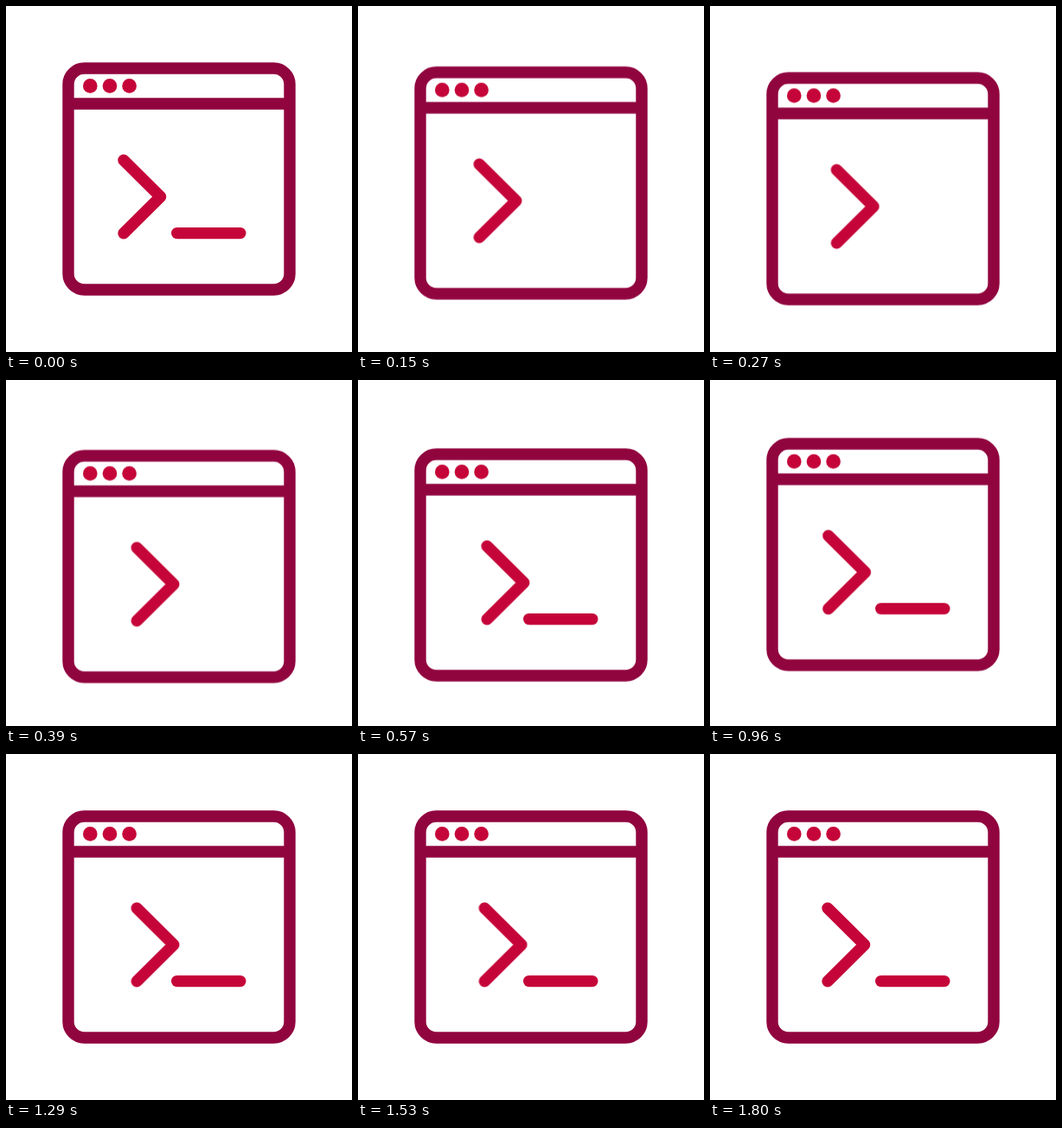
These frames come from a looping animation (400x400 px, 1830 ms). An HTML page:

```html
<!DOCTYPE html>
<html lang="en">
<head>
<meta charset="utf-8">
<title>Terminal icon</title>
<style>
  html, body { margin: 0; width: 100%; height: 100%; overflow: hidden; background: #fff; }
  svg { display: block; width: 100%; height: 100%; }
  .frame, .prompt { fill: none; stroke-width: 13.4; }
  .frame { stroke: #91053f; }
  .prompt { stroke: #c50539; stroke-linecap: round; stroke-linejoin: round; }
  .dots { fill: #c50539; }

  .window, .chevron, .cursor { animation: 1830ms infinite; }
  .window, .chevron { animation-timing-function: cubic-bezier(.3333, 0, .6667, 1); }
  .window { animation-name: dip; }
  .chevron { animation-name: nudge; }
  .cursor { animation-name: blink; animation-timing-function: step-end; }

  @keyframes dip {
    0%, 60.11%, 100% { transform: translateY(0); }
    22.95% { transform: translateY(15.8px); }
  }
  /* two pushes to the right, 900 ms each */
  @keyframes nudge {
    0%, 49.18%, 98.36%, 100% { transform: translateX(0); }
    24.59%, 73.77% { transform: translateX(16px); }
  }
  @keyframes blink {
    0%, 23.7% { visibility: visible; }
    8% { visibility: hidden; }
    100% { visibility: visible; }
  }
</style>
</head>
<body>
<svg viewBox="0 0 400 400">
  <g class="window">
    <g class="frame">
      <rect x="72" y="72" width="256" height="256" rx="18.5"/>
      <path d="M72 113H328"/>
    </g>
    <g class="dots">
      <circle cx="97.3" cy="92.4" r="8.3"/>
      <circle cx="120" cy="92.4" r="8.3"/>
      <circle cx="142.6" cy="92.4" r="8.3"/>
    </g>
    <g class="prompt">
      <path class="chevron" d="M136 178.2L178.6 220.5L136 262.8"/>
      <path class="cursor" d="M197.7 262.6H270.8"/>
    </g>
  </g>
</svg>
</body>
</html>
```
